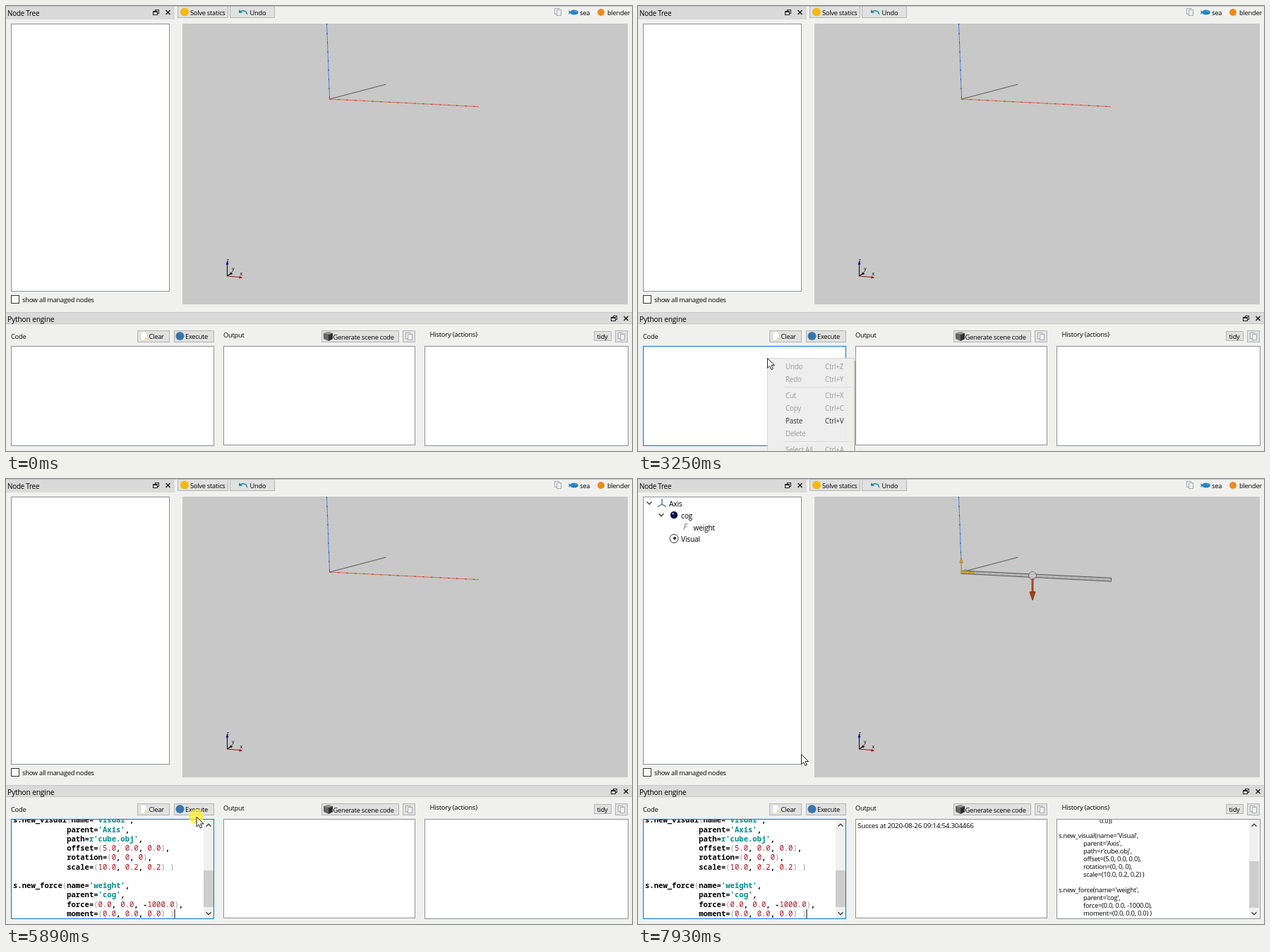
Recreate the animation shown at these times as an HTML page with a canvas. Size 887x631 px, loop 8 s.

```html
<!DOCTYPE html>
<html lang="en">
<head>
<meta charset="utf-8">
<title>Python engine</title>
<style>
html, body { margin: 0; width: 100%; height: 100%; overflow: hidden; background: #f0f0ef; }
canvas { display: block; }
</style>
</head>
<body>
<canvas id="stage" width="887" height="631"></canvas>
<script>
const g = document.getElementById('stage').getContext('2d');
const UI = '"Open Sans", "Noto Sans", sans-serif';
const MONO = '"Noto Sans Mono", "DejaVu Sans Mono", monospace';
const BLUE = '#0078d7', LOOP = 8000;

// time, pointer x, pointer y, flags: a arrow, i text beam, c caret, h click halo
const STEPS = [
  [0, 0, 0, ''],
  [200, 376, 545, 'i'], [400, 350, 535, 'i'], [600, 312, 522, 'i'],
  [810, 268, 508, 'i'], [1010, 234, 495, 'ic'], [1210, 221, 488, 'ic'],
  [1410, 218, 478, 'a'], [1620, 216, 475, 'a'], [1830, 215, 473, 'ac'],
  [2230, 215, 473, 'a'],
  [2650, 207, 487, 'ic'], [2850, 192, 503, 'ic'], [3050, 187, 507, 'i'],
  [3250, 183, 499, 'a'], [3450, 183, 499, 'a'], [3650, 193, 541, 'a'],
  [3870, 210, 570, 'a'], [4070, 220, 579, 'a'],
  [4470, 225, 584, 'ic'],
  [4870, 227, 580, 'i'], [5070, 236, 560, 'i'], [5270, 250, 528, 'ic'],
  [5490, 263, 498, 'ic'], [5690, 269, 480, 'a'], [5890, 269.5, 478.5, 'ach'],
  [6090, 270, 478, 'a'],
  [6510, 272, 476, 'ac'], [6710, 272, 475, 'ach'],
  [7130, 272, 475, 'ah'], [7330, 272, 475, 'a'],
  [7730, 252, 431, 'ac'], [7930, 231, 390, 'ac']
];

const CODE = `s.new_visual(name='Visual',
            parent='Axis',
            path=r'cube.obj',
            offset=(5.0, 0.0, 0.0),
            rotation=(0, 0, 0),
            scale=(10.0, 0.2, 0.2) )

s.new_force(name='weight',
            parent='cog',
            force=(0.0, 0.0, -1000.0),
            moment=(0.0, 0.0, 0.0) )`.split('\n');

function text(s, x, y, size = 9.3, color = '#000', style = '') {
  g.font = `${style} ${size}px ${UI}`;
  g.letterSpacing = '-0.25px';
  g.fillStyle = color;
  g.fillText(s, x, y);
}

function fill(x, y, w, h, color) {
  g.fillStyle = color;
  g.fillRect(x, y, w, h);
}

function box(x, y, w, h, color, edge) {
  fill(x, y, w, h, edge);
  fill(x + 1, y + 1, w - 2, h - 2, color);
}

function line(points, color, width = 1, dash = []) {
  g.beginPath();
  points.forEach(([x, y]) => g.lineTo(x, y));
  g.strokeStyle = color;
  g.lineWidth = width;
  g.setLineDash(dash);
  g.stroke();
  g.setLineDash([]);
}

function shape(points, color, edge, width = 1) {
  g.beginPath();
  points.forEach(([x, y]) => g.lineTo(x, y));
  g.closePath();
  g.fillStyle = color;
  g.fill();
  if (edge) { g.strokeStyle = edge; g.lineWidth = width; g.stroke(); }
}

function disc(x, y, r, color, edge) {
  g.beginPath();
  g.arc(x, y, r, 0, 7);
  g.fillStyle = color;
  g.fill();
  if (edge) { g.strokeStyle = edge; g.lineWidth = 1; g.stroke(); }
}

function clipped(x, y, w, h, draw) {
  g.save();
  g.beginPath();
  g.rect(x, y, w, h);
  g.clip();
  draw();
  g.restore();
}

function button(x, y, w, h, state) {
  const [color, edge] = { hover: ['#e5f1fb', BLUE], down: ['#cce4f7', '#2a86d0'] }[state] || ['#e1e1e1', '#b4b4b4'];
  box(x, y, w, h, color, edge);
}

function copyIcon(x, y) {
  box(x, y, 7, 9, '#f0f0f0', '#a6abb0');
  box(x + 3, y + 2, 7, 9, '#f0f0f0', '#a6abb0');
}

function chevron(x, y, dir, r = 3.5) {
  line([[x - r, y - dir * r / 2], [x, y + dir * r / 2], [x + r, y - dir * r / 2]], '#404040', 1.4);
}

function dockIcons(x, y) {
  box(x - 1, y - 4, 6, 6, '#dadada', '#222');
  box(x - 4, y - 2, 7, 6, '#dadada', '#222');
  fill(x - 4, y - 2, 7, 2, '#222');
  const c = x + 17.5;
  line([[c - 3, y - 3], [c + 3, y + 3]], '#222', 1.6);
  line([[c - 3, y + 3], [c + 3, y - 3]], '#222', 1.6);
}

function scrollbar(x, thumbY, thumbH) {
  fill(x, 483, 14, 140, '#f0f0f0');
  fill(x, thumbY, 14, thumbH, '#cdcdcd');
  chevron(x + 7, 491, -1);
  chevron(x + 7, 616, 1);
}

function toolbar() {
  fill(0, 0, 239, 19, '#dadada');
  fill(0, 0, 887, 1, '#c4c4c4');
  text('Node Tree', 2, 13.5, 9.9);
  dockIcons(212, 9);

  button(243, 0, 72, 17);
  disc(253, 8.5, 6, '#f5b912');
  text('Solve statics', 261, 13);
  button(317, 0, 64, 17);
  line([[331, 8], [336, 6.5], [340, 8], [342, 12]], '#168a9c', 1.4);
  shape([[330, 5], [335, 10], [330, 10]], '#168a9c');
  text('Undo', 345.5, 13);

  copyIcon(777, 3);
  g.beginPath();
  g.ellipse(805, 9, 6, 3.5, 0, 0, 7);
  g.fillStyle = '#2583c4';
  g.fill();
  shape([[801, 9], [797, 6], [798, 9], [797, 12]], '#2583c4');
  fill(807, 7, 1, 1, '#fff');
  text('sea', 813, 13);
  disc(843, 9, 5, '#ee8a1d');
  text('blender', 852, 13);
}

function tree(built) {
  box(7, 25, 225, 380, '#fff', '#8c9095');
  box(7, 410, 12, 12, '#fff', '#333');
  text('show all managed nodes', 23, 420);
  if (!built) return;
  chevron(16, 34, 1);
  chevron(33, 51, 1);
  line([[34, 28], [34, 36], [28, 39]], '#31588c', 1.2);
  line([[34, 36], [40, 39]], '#31588c', 1.2);
  text('Axis', 44, 38.5, 10.3);
  disc(51, 51, 5.2, '#071342');
  disc(49.5, 49.2, 1.3, '#8ea4e8');
  text('cog', 61, 55.5, 10.3);
  text('F', 64, 72, 11.5, '#a9a9a9', 'italic bold');
  text('weight', 78.5, 72.5, 10.3);
  disc(51, 84.5, 6, '#fff', '#333');
  disc(52, 84, 2.1, '#222');
  text('Visual', 61, 89, 10.3);
}

function cone(points) { shape(points, '#e0a52d', '#9a7420', 0.7); }

function scene(built) {
  fill(250, 25, 631, 398, '#c8c8c8');
  const up = [[454.5, 25], [458.5, 132]], right = [[458.5, 132], [670, 142.7]];
  line(up, '#4d83e0');
  line(up, '#30466f', 1, [2, 11]);
  line([[458.5, 132], [538.5, 111]], '#4a4a4a', 0.9);
  line(right, '#e0674c');
  line(right, '#7d3020', 1, [2, 10]);

  // orientation marker
  line([[313.5, 383], [313.5, 366]], '#10105a', 1.2);
  shape([[313.5, 361.5], [311.5, 366.5], [315.5, 366.5]], '#10107a');
  line([[313.5, 383], [319, 379]], '#111', 1.2);
  disc(319, 379.3, 1.7, '#111');
  line([[313.5, 383], [331, 384.5]], '#8c2013', 1.2);
  shape([[335.5, 385], [330.5, 382.7], [330.5, 386.8]], '#a31c10');
  text('z', 312.5, 363, 7);
  text('y', 320, 375, 7);
  text('x', 331.5, 382, 7);
  if (!built) return;

  shape([[458, 130], [670.5, 140.3], [670.5, 145.2], [458, 134.2]], '#b9b9b9', '#45494c', 0.9);
  line([[478, 133.2], [669, 143]], '#b09a97', 0.8, [5, 4]);
  line([[458.3, 133], [458.3, 117]], '#d39c2c', 1.6);
  line([[458.5, 132.5], [472, 133]], '#d39c2c', 2);
  cone([[458, 112], [455.7, 118.5], [460.3, 118.5]]);
  cone([[477, 133.3], [470, 131.3], [470, 135]]);
  cone([[468, 129.5], [463, 128.2], [463, 131]]);
  disc(559, 137, 5.5, 'rgba(215,215,215,.65)', '#666');
  line([[559, 141], [559, 161]], '#a2481c', 3);
  shape([[559, 172], [555, 160], [563, 160]], '#a84012', '#7b3210');
}

function highlightedLine(s, x, y) {
  g.letterSpacing = '0px';
  for (const [token] of s.matchAll(/r?'.*?'|\d[\d.]*|[()]|[^]/g)) {
    const string = token.includes("'"), number = /\d/.test(token), paren = /[()]/.test(token);
    g.font = `${string ? 700 : number ? 500 : paren ? 400 : 600} 10.58px ${MONO}`;
    g.fillStyle = string ? '#008c8c' : number ? '#a8101c' : paren ? '#999' : '#000';
    g.fillText(token, x, y);
    x += g.measureText(token).width;
  }
}

function engine(t, flags) {
  const pasted = t >= 4470, built = t >= 7130;
  const clearState = t >= 1410 && t < 2650 && 'hover';
  const runState = t >= 6510 && t < 7730 && (t < 6710 || t >= 7330 ? 'hover' : 'down');
  fill(0, 434, 887, 17, '#dadada');
  fill(0, 434, 887, 1, '#c6c6c6');
  fill(0, 450, 887, 1, '#c6c6c6');
  text('Python engine', 2, 447.5, 10.4);
  dockIcons(861, 443);

  text('Code', 7, 472);
  button(186, 460, 46, 17, clearState);
  shape([[191, 462], [197, 462], [200, 465], [200, 474], [191, 474]], '#fff', '#ddd');
  disc(199, 472, 2.5, '#e9dfa0');
  text('Clear', 202.5, 472);
  button(238, 460, 57, 17, runState);
  disc(246.5, 468, 6, '#3976a9');
  text('Execute', 254, 472);

  text('Output', 308, 469.5);
  button(447, 460, 110, 17);
  shape([[450, 464], [457, 462], [463, 464], [463, 472], [457, 475], [450, 472]], '#666');
  shape([[457, 466], [463, 464], [463, 472], [457, 475]], '#303030');
  shape([[450, 464], [457, 462], [463, 464], [457, 466]], '#929292');
  text('Generate scene code', 463.5, 472.5);
  button(562, 460, 18, 17);
  copyIcon(566, 463);
  text('History (actions)', 600.5, 468.5, 9.5);
  button(833, 461, 25, 14);
  text('tidy', 837.5, 471.5);
  button(863, 460, 18, 17);
  copyIcon(867, 463);

  box(7, 482, 288, 142, '#fff', t >= 1010 ? BLUE : '#8c9095');
  box(308, 482, 272, 141, '#fff', '#8c9095');
  box(593, 482, 289, 142, '#fff', '#8c9095');

  if (pasted) {
    clipped(8, 483, 272, 140, () =>
      CODE.forEach((s, i) => highlightedLine(s, 10, 487.3 + i * 13.25)));
    scrollbar(280, 555, 52);
  }
  if (flags.includes('c')) {
    if (pasted) fill(238.5, 610, 1, 13, '#000');
    else fill(10, 485, 1, 13, '#000');
  }
  if (!built) return;
  text('Succes at 2020-08-26 09:14:54.304466', 311, 494.5, 9.8);
  clipped(594, 483, 272, 140, () => {
    text('0.0))', 654, 487.5, 9.4);
    CODE.forEach((s, i) => text(s.trim(), s[0] === ' ' ? 631 : 596, 509 + i * 11, 9.4));
  });
  scrollbar(866, 542, 66);
}

function menu(t, y) {
  if (t < 3250 || t >= 4470) return;
  const items = [['Undo', 'Z', 511], ['Redo', 'Y', 529], ['Cut', 'X', 552], ['Copy', 'C', 570],
    ['Paste', 'V', 588], ['Delete', '', 606], ['Select All', 'A', 629]];
  g.save();
  g.globalAlpha = t < 3450 ? 0.85 : 1;
  fill(306, 503, 2, 128, '#a5a5a5');
  box(183, 499, 124, 140, '#f2f2f2', '#d0d0d0');
  for (const [name, key, mid] of items) {
    if (t >= 3650 && Math.abs(mid - y) < 9.1) fill(186, mid - 9, 118, 18, mid === 588 ? '#91c9f7' : '#e6e6e6');
    const color = name === 'Paste' ? '#111' : '#8d8d8d';
    text(name, 209, mid + 4, 9.9, color);
    if (key) text('Ctrl+' + key, 265, mid + 4, 9.9, color);
  }
  fill(208, 540, 95, 1, '#d9d9d9');
  fill(208, 617, 95, 1, '#d9d9d9');
  g.restore();
}

function pointer(x, y, flags) {
  if (flags.includes('h')) disc(x, y, 10.5, 'rgba(250,240,45,.72)');
  if (flags.includes('a')) {
    const arrow = [[0, 0], [0, 14], [3.2, 11], [5.4, 16], [7.8, 15], [5.6, 10], [10, 10]];
    shape(arrow.map(([a, b]) => [x + a + 0.5, y + b + 0.5]), '#fff', '#222');
  }
  if (flags.includes('i')) {
    line([[x, y - 7], [x, y + 7]], '#111', 1.5);
    for (const end of [y - 7, y + 7]) line([[x - 4, end], [x + 4, end]], '#111', 1.3);
  }
}

function draw(t) {
  const [, x, y, flags] = STEPS.findLast(step => step[0] <= t);
  fill(0, 0, 887, 631, '#f0f0ef');
  toolbar();
  tree(t >= 7130);
  scene(t >= 7130);
  engine(t, flags);
  menu(t, y);
  pointer(x, y, flags);
}

const start = performance.now();
function frame() {
  draw((performance.now() - start) % LOOP);
  requestAnimationFrame(frame);
}
frame();
</script>
</body>
</html>
```
